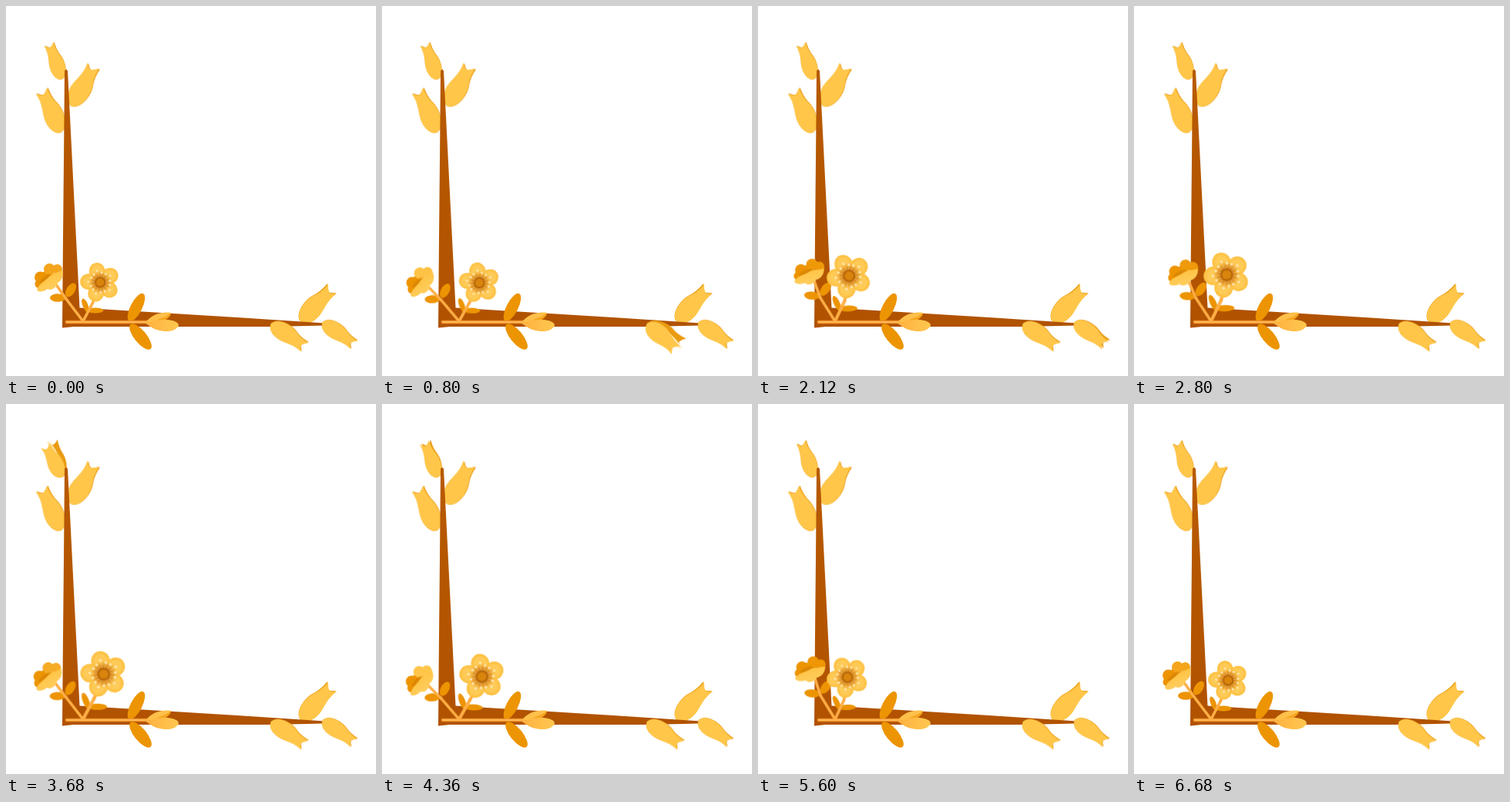
Recreate the animation shown at these times as an HTML page. Size 480 by 480 pixels, loop 6.72 s.

```html
<!DOCTYPE html>
<html lang="en">
<head>
<meta charset="utf-8">
<title>Blossom corner</title>
<style>
html, body { margin: 0; width: 100%; height: 100%; overflow: hidden; background: #fff; }
svg { display: block; width: 100vw; height: 100vh; }

/* Tulips open one after another, each for a sixth of the loop */
.opens path { animation: 6720ms ease-in-out var(--delay) infinite; }
.opens .back { animation-name: back; }
.opens .inner { animation-name: inner; }
.opens .front { animation-name: front; }
.inner { transform: scale(.75); }
.back { transform: rotate(1.5deg); }
@keyframes back {
  0%, 16.667%, 100% { transform: rotate(1.5deg); }
  8.333% { transform: rotate(10deg); }
}
@keyframes inner {
  0%, 16.667%, 100% { transform: scale(.75); }
  8.333% { transform: scale(1); }
}
@keyframes front {
  0%, 16.667%, 100% { transform: none; }
  8.333% { transform: rotate(-12deg) scale(1.06, .93); }
}

/* The two blossoms lean together and apart */
.sway { animation: sway 3360ms ease-in-out infinite; }
@keyframes sway {
  0%, 100% { transform: rotate(0deg); }
  31.5% { transform: rotate(calc(var(--lean) * -.58)); }
  72% { transform: rotate(var(--lean)); }
}
.grow { transform-origin: 100px 409px; animation: grow 6720ms ease-in-out infinite; }
@keyframes grow {
  0%, 100% { transform: scale(1); }
  50% { transform: scale(1.17); }
}
/* The far petals catch the light as the small blossom leans out */
.lit { animation: lit 3360ms ease-in-out infinite; }
@keyframes lit {
  0%, 100% { fill: #f4a51c; }
  31.5% { fill: #ffc64a; }
  72% { fill: #ed9402; }
}
.stalk { transform-origin: 100px 409px; }
.left .stalk { --lean: 6deg; }
.left .head { --lean: 12deg; transform-origin: 78px 380px; }
.right .stalk { --lean: -3deg; }
.right .head { --lean: -9deg; transform-origin: 112px 386px; }

.stem { fill: none; stroke: #ffae45; stroke-width: 3.6; stroke-linecap: round; }
.rim { fill: none; stroke: #f09028; stroke-width: 4.6; stroke-linecap: round; }
.shine { fill: none; stroke: #ffb858; stroke-width: 2.2; stroke-linecap: round; }
.leaf { fill: #ed9402; }
.petal { fill: url(#petal); }
</style>
</head>
<body>
<svg viewBox="0 0 480 480">
  <defs>
    <linearGradient id="wood" x1="0" y1="0" x2="0" y2="1">
      <stop offset="0" stop-color="#b85a00"/>
      <stop offset="1" stop-color="#b05200"/>
    </linearGradient>
    <linearGradient id="pale" x1="0" y1="0" x2="0" y2="1">
      <stop offset="0" stop-color="#fff3d6"/>
      <stop offset=".4" stop-color="#ffdf98"/>
      <stop offset="1" stop-color="#ffc64a"/>
    </linearGradient>
    <radialGradient id="petal">
      <stop offset=".55" stop-color="#ffcb58"/>
      <stop offset="1" stop-color="#fdbf3e"/>
    </radialGradient>
    <radialGradient id="glow">
      <stop offset=".35" stop-color="#c87410"/>
      <stop offset=".65" stop-color="#e3982e" stop-opacity=".8"/>
      <stop offset="1" stop-color="#ffca58" stop-opacity="0"/>
    </radialGradient>
    <linearGradient id="cup" x1="0" y1="0" x2=".6" y2="1">
      <stop offset="0" stop-color="#f9b02c"/>
      <stop offset=".5" stop-color="#ffc64a"/>
      <stop offset="1" stop-color="#ffcf62"/>
    </linearGradient>
    <linearGradient id="bud" x1="0" y1="0" x2="1" y2="0">
      <stop offset="0" stop-color="#ffb040"/>
      <stop offset="1" stop-color="#ffc850"/>
    </linearGradient>
  </defs>

  <g id="behind"></g>
  <path fill="url(#wood)" d="M76 84L78 82L80 84L95.5 391.5L300 404L414 411.5L412 414.5L345 416L88 416L73 417.5L74 300L75 200Z"/>
  <g id="before"></g>

  <g>
    <ellipse class="leaf" cx="169" cy="391" rx="20" ry="7.5" transform="rotate(-63 169 391)"/>
    <ellipse class="leaf" cx="174.500" cy="429" rx="20.500" ry="8" transform="rotate(51 174.500 429)"/>
    <path class="rim" d="M79 410H186"/>
    <path class="shine" d="M79 410H186"/>
    <path fill="#ffc04a" d="M182 410C187 402 200 396 214 398C213 404 206 407 196 411Z"/>
    <path fill="#f6a41c" d="M196 407C202 405 209 403 214 398C213 404 208 407 200 410Z"/>
    <path fill="url(#bud)" d="M181 411C190 409 200 406 210 407C218 408 223 410 224 414C222 420 215 422.500 206 422C195 421 187 417 181 411Z"/>
  </g>

  <g class="left">
    <g class="stalk sway">
      <path class="stem" d="M100 409L78 380"/>
      <ellipse class="leaf" cx="67" cy="378.500" rx="10" ry="5.200"/>
      <ellipse class="leaf" cx="84" cy="368.500" rx="10" ry="5.500" transform="rotate(-58 84 368.500)"/>
      <g class="head sway">
        <path class="stem" d="M78 380L64 360"/>
        <g class="leaf">
          <circle cx="44.500" cy="352" r="7.500"/>
          <circle cx="43.500" cy="360.500" r="6"/>
          <circle cx="54" cy="352" r="9"/>
        </g>
        <g class="lit">
          <circle cx="56.500" cy="341.500" r="7.500"/>
          <circle cx="66.500" cy="341.500" r="6.500"/>
        </g>
        <ellipse fill="#c97808" opacity=".45" cx="51" cy="353" rx="9" ry="2.500" transform="rotate(-38 51 353)"/>
        <path fill="url(#cup)" d="M40 368C43 360 51 357 56 351C62 346 68 346 73 342C75 349 73 356 67 359C65 366 59 370 54 367C49 371 42 372 40 368Z"/>
      </g>
    </g>
  </g>

  <g class="right grow">
    <g class="stalk sway">
      <ellipse class="leaf" cx="103" cy="388.500" rx="9.500" ry="3.500" transform="rotate(68 103 388.500)"/>
      <ellipse class="leaf" cx="116" cy="395" rx="10.500" ry="3.500"/>
      <path class="stem" d="M100 409L112 386"/>
      <g class="head sway">
        <path class="stem" d="M112 386L116 377"/>
        <g id="blossom" transform="translate(122.200 358.500) scale(1.04)"></g>
      </g>
    </g>
  </g>
</svg>
<script>
const el = id => document.getElementById(id);

const body = 'M0 0C-10 -1 -14 -14 -12.5 -25C-11 -36 -6 -44 -9 -59Q-5 -54 -1 -53Q4 -55 8 -60Q7 -46 11.5 -36C16 -24 12.5 -2 0 0Z';
const spike = 'M0 0C-11 -12 -11 -42 -1 -69C9 -52 13 -20 0 0Z';

// A negative sx mirrors the tulip; slot: which sixth of the loop it opens in
function tulip(layer, x, y, turn, sx, sy, slot) {
  const opens = slot === undefined ? '' : `class="opens" style="--delay:${(slot - 6) * 1120}ms"`;
  el(layer).insertAdjacentHTML('beforeend',
    `<g ${opens} transform="translate(${x} ${y}) rotate(${turn}) scale(${sx} ${sy})">
      <path class="back" fill="#e99a10" d="${body}"/>
      <path class="inner" fill="url(#pale)" d="${spike}"/>
      <path class="front" fill="#ffc64a" d="${body}"/>
    </g>`);
}

tulip('behind', 72.5, 95, -20, .76, .82, 3);
tulip('behind', 71.5, 164, -25, .97, 1.01, 4);
tulip('behind', 84.5, 130, 29, 1, 1.01);
tulip('behind', 382, 409.5, 44, -.97, 1);
tulip('before', 344, 412, 125, -.88, .9, 0);
tulip('before', 411, 410, 126, -.82, .85, 1);

const ring = (n, start, draw) =>
  Array.from({ length: n }, (_, i) => `<g transform="rotate(${start + i * 360 / n})">${draw(i)}</g>`).join('');

el('blossom').innerHTML =
  ring(5, -15, () => '<ellipse class="petal" cy="-14.5" rx="10" ry="10.5"/>') +
  '<circle r="12" fill="#ffc64a"/><circle r="16" fill="url(#glow)"/>' +
  ring(15, -15, i => {
    const r = i % 3 ? 12.5 : 15;
    return `<path d="M0 -6V${-r}" stroke="#ffdc94" stroke-width=".6" opacity=".5"/>
      <circle cy="${-r}" r="1.4" fill="#ffe6ae"/>`;
  }) +
  '<circle r="6.8" fill="#b9690a"/><circle r="4.8" fill="#d9840c"/>';
</script>
</body>
</html>
```
